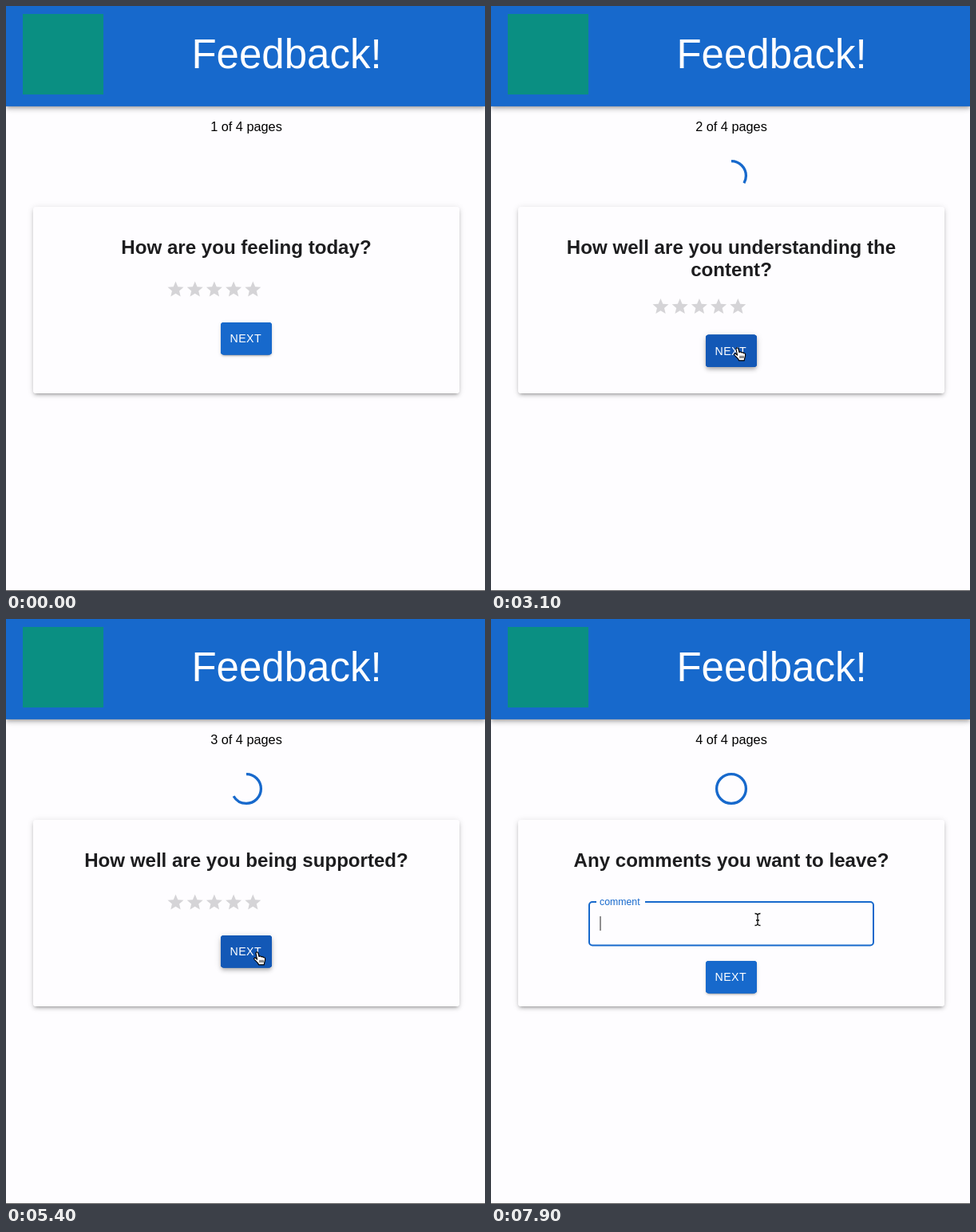
Animation, 600 px wide and 734 px high, one loop 8000 ms. Source, as an HTML page with a canvas:

```html
<!DOCTYPE html>
<html lang="en">
<head>
<meta charset="utf-8">
<title>Feedback form</title>
<style>
html, body { margin: 0; width: 100%; height: 100%; overflow: hidden; background: #fefdff; }
canvas { display: block; }
</style>
</head>
<body>
<canvas id="stage" width="600" height="734"></canvas>
<script>
const ctx = document.getElementById('stage').getContext('2d');
const LOOP = 8000, STEP = 100, CENTER = 301;
const BLUE = '#1769cc', BLUE_HOVER = '#1358b6', PAPER = '#fefdff', INK = '#1d1d1f';

// Shadows: [offset y, blur, spread, alpha]
const RAISED = [[3, 1, -2, .2], [2, 2, 0, .14], [1, 5, 0, .12]];
const FLOATING = [[2, 4, -1, .2], [4, 5, 0, .14], [1, 10, 0, .12]];
const CARD = [[3, 3, -2, .2], [3, 4, 0, .14], [1, 8, 0, .12]];

const PAGES = [
  { start: 0, rated: 1900, title: ['How are you feeling today?'], stars: 343.5, next: 397 },
  { start: 2400, rated: 3900, title: ['How well are you understanding the', 'content?'], stars: 365, next: 412.5 },
  { start: 4400, rated: 6100, title: ['How well are you being supported?'], stars: 343.5, next: 397 },
  { start: 6500, title: ['Any comments you want to leave?'], next: 429 }
];
const ALERTS = [[500, 1500], [3200, 3500], [5500, 5800]];
const FOCUS = 7700;
const RATINGS = ['Useless', 'Useless+', 'Poor', 'Poor+', 'Ok', 'Ok+', 'Good', 'Good+', 'Excellent', 'Excellent+'];

// Pointer hotspot: [time, x, y]
const TRACK = [
  [100, 266, 353], [200, 308, 406], [500, 308, 406], [1300, 308, 413], [1500, 308, 414],
  [1700, 270, 362], [1900, 316, 354], [2100, 310, 400], [2400, 308, 414], [3100, 309, 428],
  [3500, 309, 426], [3700, 292, 382], [3900, 316, 376], [4100, 309, 415], [4300, 301, 449],
  [4600, 309, 410], [4800, 309, 410], [5400, 315, 417], [5800, 314, 416], [6000, 300, 358],
  [6100, 316, 354], [6300, 309, 404], [6500, 309, 406], [7200, 312, 440], [7300, 312, 440],
  [7500, 334, 377], [8000, 334, 377]
];

const STAR = new Path2D('M12 17.27L18.18 21l-1.64-7.03L22 9.24l-7.19-.61L12 2 9.19 8.63 2 9.24l5.46 4.73L5.82 21z');
const HAND = new Path2D('M3 2.5C3 .4 5.5 .4 6 2.5L7 6.5C8 5.5 9.5 6 9.7 7C10.7 6.2 12 6.7 12.2 7.7C13.2 7.2 14.5 7.8 14.6 9C15 12 13.5 13 13.3 16.8H6.5C6 14 3 12.5 1 10C0 8.5 2 7.5 3.2 8.8L4.5 10Z');
const KNUCKLES = new Path2D('M8 10.8V14M10 10.8V14M12 10.8V14');
const ARROW = new Path2D('M0 0V14.5L3.4 11.4 5.6 16.3 8 15.2 5.9 10.5H10.5Z');
const BEAM = new Path2D('M-3.5 -7.5Q0 -7.5 0 -5V5Q0 7.5 -3.5 7.5M3.5 -7.5Q0 -7.5 0 -5V5Q0 7.5 3.5 7.5M-2 1H2');

const clamp = v => Math.min(1, Math.max(0, v));
const mix = (a, b, k) => a + (b - a) * k;
const smooth = k => k * k * (3 - 2 * k);
const inside = (p, x, y, w, h) => p && p.x >= x && p.x <= x + w && p.y >= y && p.y <= y + h;

function box(x, y, w, h, r, fill, shadows = []) {
  ctx.fillStyle = fill;
  const shape = grow => {
    ctx.beginPath();
    ctx.roundRect(x - grow, y - grow, w + 2 * grow, h + 2 * grow, r);
    ctx.fill();
  };
  for (const [dy, blur, spread, alpha] of shadows) {
    ctx.save();
    ctx.shadowColor = `rgba(0,0,0,${alpha})`;
    ctx.shadowBlur = blur;
    ctx.shadowOffsetY = dy;
    shape(spread);
    ctx.restore();
  }
  shape(0);
}

function text(str, x, y, size, color, { bold = false, align = 'left', spacing = 0 } = {}) {
  ctx.font = `${bold ? 'bold ' : ''}${size}px "Liberation Sans", Arial, sans-serif`;
  ctx.textAlign = align;
  ctx.letterSpacing = spacing + 'px';
  ctx.fillStyle = color;
  ctx.fillText(str, x, y);
}

function pointerAt(t) {
  if (t < TRACK[0][0]) return null;
  const i = TRACK.findIndex(key => key[0] > t);
  const [t0, x0, y0] = TRACK[i - 1], [t1, x1, y1] = TRACK[i];
  const k = (t - t0) / (t1 - t0);
  return { x: mix(x0, x1, k), y: mix(y0, y1, k) };
}

function alertAt(t) {
  const times = ALERTS.find(([open, close]) => t >= open && t < close + 150);
  if (!times) return null;
  const [open, close] = times;
  if (t >= close) {
    const age = t - close + 25, k = clamp(age / 150) ** 1.2;
    return { closing: true, dim: clamp(1 - age / 100), scale: 1 - k / 2, alpha: 1 - k };
  }
  const k = clamp((t - open + 50) / 150);
  return { closing: false, dim: clamp(k * 1.5), scale: 1 - .3 * (1 - k) ** 2, alpha: 1 };
}

function drawHeader(pageNumber) {
  box(0, -10, 600, 135.5, 0, BLUE, FLOATING);
  box(21, 10, 101, 101, 0, '#0a8f82');
  text('Feedback!', 351.5, 78, 51, '#fff', { align: 'center' });
  text(`${pageNumber} of 4 pages`, CENTER, 157, 16.3, '#000', { align: 'center' });
}

function drawProgress(fraction) {
  if (fraction <= 0) return;
  ctx.beginPath();
  ctx.arc(CENTER, 213, 18.4, -Math.PI / 2, -Math.PI / 2 + fraction * 2 * Math.PI);
  ctx.strokeStyle = BLUE;
  ctx.lineWidth = 3.3;
  ctx.stroke();
}

function drawStars(y, value, hovering) {
  for (let i = 0; i < 5; i++) {
    const fill = clamp(value - i);
    ctx.save();
    ctx.translate(200.5 + 24.2 * i, y);
    if (hovering && i === Math.ceil(value) - 1) {
      ctx.translate(12, 12);
      ctx.scale(1.2, 1.2);
      ctx.translate(-12, -12);
    }
    ctx.fillStyle = '#d5d4d7';
    if (fill < 1) ctx.fill(STAR);
    ctx.beginPath();
    ctx.rect(0, 0, 24 * fill, 24);
    ctx.clip();
    ctx.fillStyle = '#fba100';
    if (fill) ctx.fill(STAR);
    ctx.restore();
  }
  if (value) text(RATINGS[value * 2 - 1], 336.5, y + 17, 16.3, INK);
}

function drawNext(y, hovered) {
  box(269, y, 64, 40.5, 4, hovered ? BLUE_HOVER : BLUE, hovered ? FLOATING : RAISED);
  text('NEXT', 280.6, y + 25, 14.2, '#fff', { spacing: .4 });
}

function drawField(t, hovered) {
  const focused = t >= FOCUS;
  const k = 1 - (1 - clamp((t - FOCUS + 30) / 200)) ** 3;
  const line = focused ? 2 : 1;
  ctx.beginPath();
  ctx.roundRect(122 + line / 2, 354 + line / 2, 358 - line, 56.5 - line, 4);
  ctx.strokeStyle = focused ? BLUE : hovered ? '#222' : '#c4c3c5';
  ctx.lineWidth = line;
  ctx.stroke();
  if (focused) {
    box(132, 353, 61 * clamp((t - FOCUS + 30) / 100), 4, 0, PAPER);
    box(136.5, 373, 1, 18, 0, '#222');
  }
  text('comment', 136, mix(388, 358.5, k), mix(16.3, 12.3, k), focused ? BLUE : '#666567');
}

function drawAlert({ closing, dim, scale, alpha }, pointer) {
  ctx.fillStyle = `rgba(0,0,0,${.44 * dim})`;
  ctx.fillRect(0, 0, 600, 734);
  ctx.save();
  ctx.translate(CENTER, 391.7);
  ctx.scale(scale, scale);
  ctx.translate(-CENTER, -391.7);
  ctx.globalAlpha = alpha;
  box(44, 318, 514, 147.5, 5, PAPER);
  text('Please select a value!', CENTER, 370, 30.4, '#505050', { bold: true, align: 'center' });
  ctx.globalAlpha = alpha * (closing ? .45 : 1);
  const hovered = inside(pointer, 272, 401, 58, 40);
  box(269, 398.5, 64, 45, 6, 'rgba(112,102,224,.5)');
  box(272, 401, 58, 40, 4, hovered ? '#4a42b6' : '#5f54d4');
  text('OK', CENTER, 427, 16.3, '#fff', { align: 'center' });
  ctx.restore();
}

function drawPointer({ x, y }, kind) {
  ctx.save();
  ctx.lineJoin = 'round';
  ctx.translate(kind === 'hand' ? x - 5 : x, y);
  if (kind === 'beam') {
    ctx.strokeStyle = '#111';
    ctx.lineWidth = 1.3;
    ctx.stroke(BEAM);
  } else {
    const hand = kind === 'hand', shape = hand ? HAND : ARROW;
    ctx.fillStyle = hand ? '#fff' : '#000';
    ctx.strokeStyle = hand ? '#000' : '#fff';
    ctx.lineWidth = 1.2;
    ctx.fill(shape);
    ctx.stroke(shape);
    ctx.lineWidth = .9;
    if (hand) ctx.stroke(KNUCKLES);
  }
  ctx.restore();
}

function render(t) {
  const index = PAGES.findLastIndex(p => t >= p.start);
  const page = PAGES[index];
  const pointer = pointerAt(t);
  const alert = alertAt(t);
  const target = alert ? null : pointer;
  const overNext = inside(target, 269, page.next, 64, 40.5);
  const overStars = page.stars && inside(target, 201, page.stars, 120, 24);
  const overField = !page.stars && inside(target, 122, 354, 358, 56);

  ctx.fillStyle = PAPER;
  ctx.fillRect(0, 0, 600, 734);
  drawHeader(index + 1);
  if (index) drawProgress((index - 1 + smooth(clamp((t - page.start + 50) / 300))) / 3);

  box(34, 252, 534, 234, 4, PAPER, CARD);
  page.title.forEach((line, i) =>
    text(line, CENTER, 311 + 28 * i, 24.1, INK, { bold: true, align: 'center' }));
  if (page.stars) {
    const value = overStars ? Math.ceil((target.x - 200.5) / 12.1) / 2 : t >= page.rated ? 5 : 0;
    drawStars(page.stars, value, overStars);
  } else {
    drawField(t, overField);
  }
  drawNext(page.next, overNext && t >= 500);
  box(0, 733, 600, 1, 0, '#5c5a5c');

  if (alert) drawAlert(alert, pointer);
  if (pointer) {
    const overOk = alert && !alert.closing && inside(pointer, 272, 401, 58, 40);
    drawPointer(pointer, overField ? 'beam' : overNext || overStars || overOk ? 'hand' : 'arrow');
  }
}

function tick() {
  render(Math.floor(performance.now() % LOOP / STEP) * STEP);
  requestAnimationFrame(tick);
}
tick();
</script>
</body>
</html>
```
